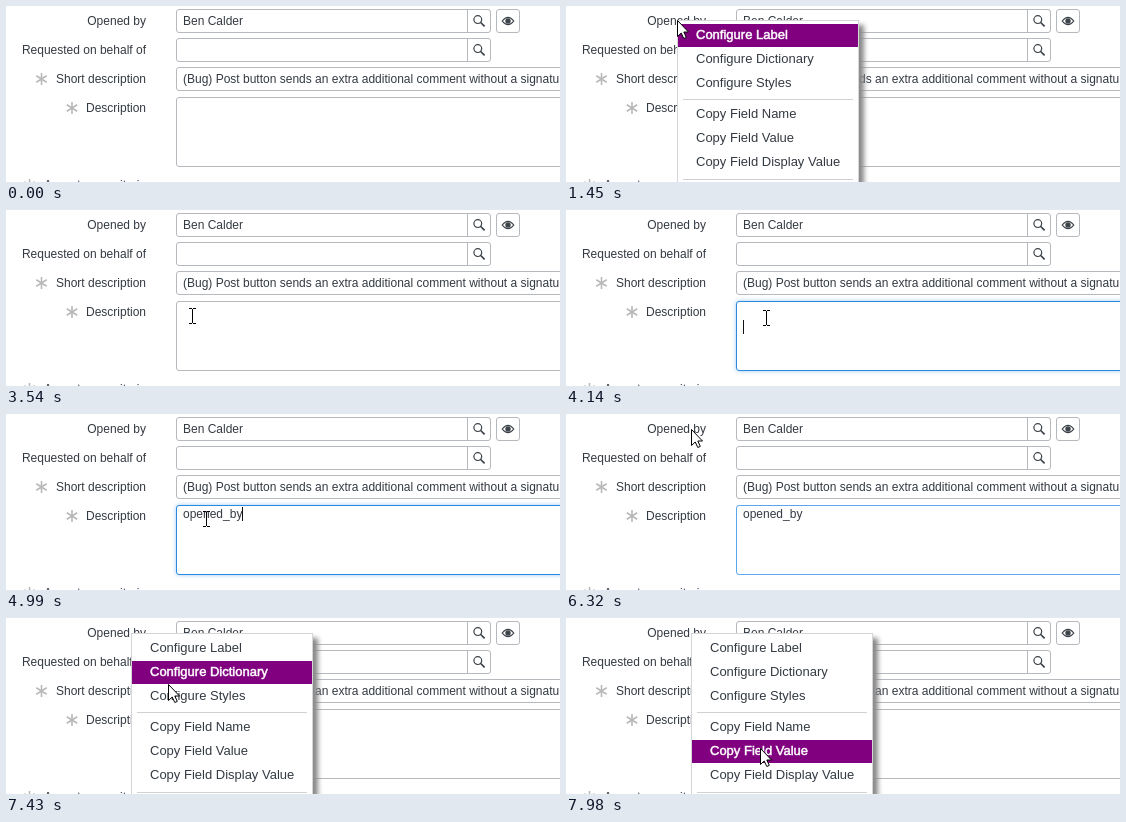
These frames come from a looping animation (554x176 px, 8000 ms). An HTML page:

```html
<!DOCTYPE html>
<html lang="en">
<head>
<meta charset="utf-8">
<title>Form field context menu</title>
<style>
  html, body { margin: 0; width: 100%; height: 100%; overflow: hidden; background: #fff; }
  svg { display: block; width: 554px; height: 176px; font: 12px "Liberation Sans", Arial, sans-serif; }
  text { fill: #343a42; }
  .label { text-anchor: end; }
  .box { fill: #fff; stroke: #b5b8bc; }
  .star { stroke: #b9b9b9; stroke-width: 1.6; fill: none; }
  .icon { fill: none; stroke: #3b4148; stroke-width: 1.2; }
  #area.half { stroke: #5ba6ea; }
  #area.full { stroke: #2b8ade; filter: drop-shadow(0 0 2px rgba(60, 150, 235, .5)); }
  #menu { font-size: 13px; }
  #panel { fill: #fff; stroke: #d4d6d8; filter: drop-shadow(5px 5px 2.5px #888); }
  .sep { stroke: #cfd1d3; }
  .row rect { fill: none; }
  .row.on rect { fill: #800080; }
  .row.on text { fill: #fff; stroke: #fff; stroke-width: .5px; }
  .off { display: none; }
</style>
</head>
<body>
<svg viewBox="0 0 554 176">
  <defs>
    <path id="star" class="star" d="M0-6V6M-5.2-3.2L5.2 3.2M-5.2 3.2L5.2-3.2"/>
    <g id="lens" class="icon">
      <circle cx="-1.2" cy="-1.4" r="3.9"/>
      <path d="M1.7 1.5L5.6 5.4" stroke-width="1.7"/>
    </g>
  </defs>

  <g class="label">
    <text x="140" y="19">Opened by</text>
    <text x="140" y="48">Requested on behalf of</text>
    <text x="140" y="77">Short description</text>
    <text x="140" y="106">Description</text>
    <text x="140" y="183">Acceptance criteria</text>
  </g>
  <use href="#star" x="35.5" y="73"/>
  <use href="#star" x="66" y="102"/>
  <use href="#star" x="23.5" y="179"/>

  <rect class="box" x="170.5" y="3.5" width="314" height="23" rx="2.5"/>
  <rect class="box" x="170.5" y="32.5" width="314" height="23" rx="2.5"/>
  <path class="box" d="M461.5 4V26M461.5 33V55"/>
  <rect class="box" x="490.5" y="3.5" width="23" height="23" rx="2.5"/>
  <rect class="box" x="170.5" y="61.5" width="430" height="23" rx="2.5"/>
  <rect class="box" id="area" x="170.5" y="91.5" width="430" height="69" rx="2.5"/>
  <use href="#lens" x="473" y="15"/>
  <use href="#lens" x="473" y="44"/>
  <g class="icon">
    <path d="M496.2 15Q502 7.600 507.800 15Q502 22.400 496.200 15Z"/>
    <circle cx="502" cy="15" r="2.100" fill="#3b4148"/>
  </g>

  <text x="177" y="19">Ben Calder</text>
  <text x="177" y="77">(Bug) Post button sends an extra additional comment without a signature</text>
  <text id="typed" x="177" y="104">opened_by</text>
  <rect id="caret" width="1" height="14" fill="#111"/>

  <g id="menu"><rect id="panel" x=".5" y=".5" width="181" height="210"/></g>

  <path id="arrow" d="M.5 .5V16.500L4.200 13L6.800 18.500L9.300 17.400L6.800 12H11.500Z" fill="#fff" stroke="#000"/>
  <path id="beam" d="M-3 -7.500H0M1 -7.500H4M.5 -7V7M-3 7.500H0M1 7.500H4" stroke="#000" fill="none"/>
</svg>
<script>
const LOOP = 8000;
const $ = id => document.getElementById(id);

// Each track: [start ms, ...values], held until the next step.
const pointer = [
  [0, ""], [530, "arrow", 90, 89],
  [680, "arrow", 94, 73], [800, "arrow", 105, 36], [920, "arrow", 111, 14],
  [1880, "arrow", 130, 37], [2030, "arrow", 140, 62], [2160, "arrow", 150, 91],
  [2300, "arrow", 155, 100], [2420, "arrow", 157, 105],
  [3540, "beam", 186, 106], [3660, "beam", 190, 107], [3780, "beam", 195, 108],
  [3900, "beam", 198, 108], [4020, "beam", 200, 108], [4420, "beam", 200, 105],
  [5130, "beam", 204, 108], [5250, "beam", 216, 118], [5370, "beam", 228, 125],
  [5520, "beam", 221, 106], [5640, "arrow", 194, 61], [5780, "arrow", 156, 26],
  [5920, "arrow", 140, 19], [6050, "arrow", 130, 16], [6170, "arrow", 125, 15],
  [7150, "arrow", 127, 16], [7300, "arrow", 142, 38], [7430, "arrow", 162, 66],
  [7580, "arrow", 179, 95], [7700, "arrow", 188, 115], [7850, "arrow", 193, 126],
  [7980, "arrow", 194, 130]
];
const menuAt = [[0, 0], [1450, 111, 14], [3540, 0], [6470, 125, 15]];
const active = [
  [0, 0], [2030, 1], [2160, 2], [2300, 3], [3540, 0],
  [7430, 1], [7580, 2], [7700, 3], [7850, 4]
];
const focus = [[0, ""], [4020, "half"], [4140, "full"], [6320, "half"], [6470, ""]];
const caretAt = [
  [0, 0], [4140, 177, 110], [4580, 177, 93], [4990, 236, 93],
  [5520, 0], [6050, 236, 93], [6320, 0]
];
const typed = [[0, false], [4990, true]];

const at = (track, t) => track.findLast(s => s[0] <= t).slice(1);

function add(parent, tag, attrs, text = "") {
  const el = document.createElementNS("http://www.w3.org/2000/svg", tag);
  for (const k in attrs) el.setAttribute(k, attrs[k]);
  el.textContent = text;
  return parent.appendChild(el);
}

const rows = ["Configure Label", "Configure Dictionary", "Configure Styles",
  "Copy Field Name", "Copy Field Value", "Copy Field Display Value"].map((name, i) => {
  const y = 4 + 24 * i + (i > 2 ? 7 : 0);
  const row = add($("menu"), "g", { class: "row" });
  add(row, "rect", { x: 1, y, width: 180, height: 23 });
  add(row, "text", { x: 19, y: y + 15 }, name);
  return row;
});
for (const y of [79.5, 159.5]) add($("menu"), "path", { class: "sep", d: `M6 ${y}H176` });

function place(el, shown, x, y) {
  el.classList.toggle("off", !shown);
  if (shown) el.setAttribute("transform", `translate(${x} ${y})`);
}

function draw(t) {
  const [kind, px, py] = at(pointer, t);
  for (const id of ["arrow", "beam"]) place($(id), kind === id, px, py);
  const [mx, my] = at(menuAt, t);
  place($("menu"), mx, mx, my);
  const [on] = at(active, t);
  rows.forEach((row, i) => row.classList.toggle("on", i === on));
  const [cx, cy] = at(caretAt, t);
  place($("caret"), cx, cx, cy);
  $("area").setAttribute("class", "box " + at(focus, t)[0]);
  $("typed").classList.toggle("off", !at(typed, t)[0]);
}

const start = performance.now();
function tick() {
  draw((performance.now() - start) % LOOP);
  requestAnimationFrame(tick);
}
tick();
</script>
</body>
</html>
```
